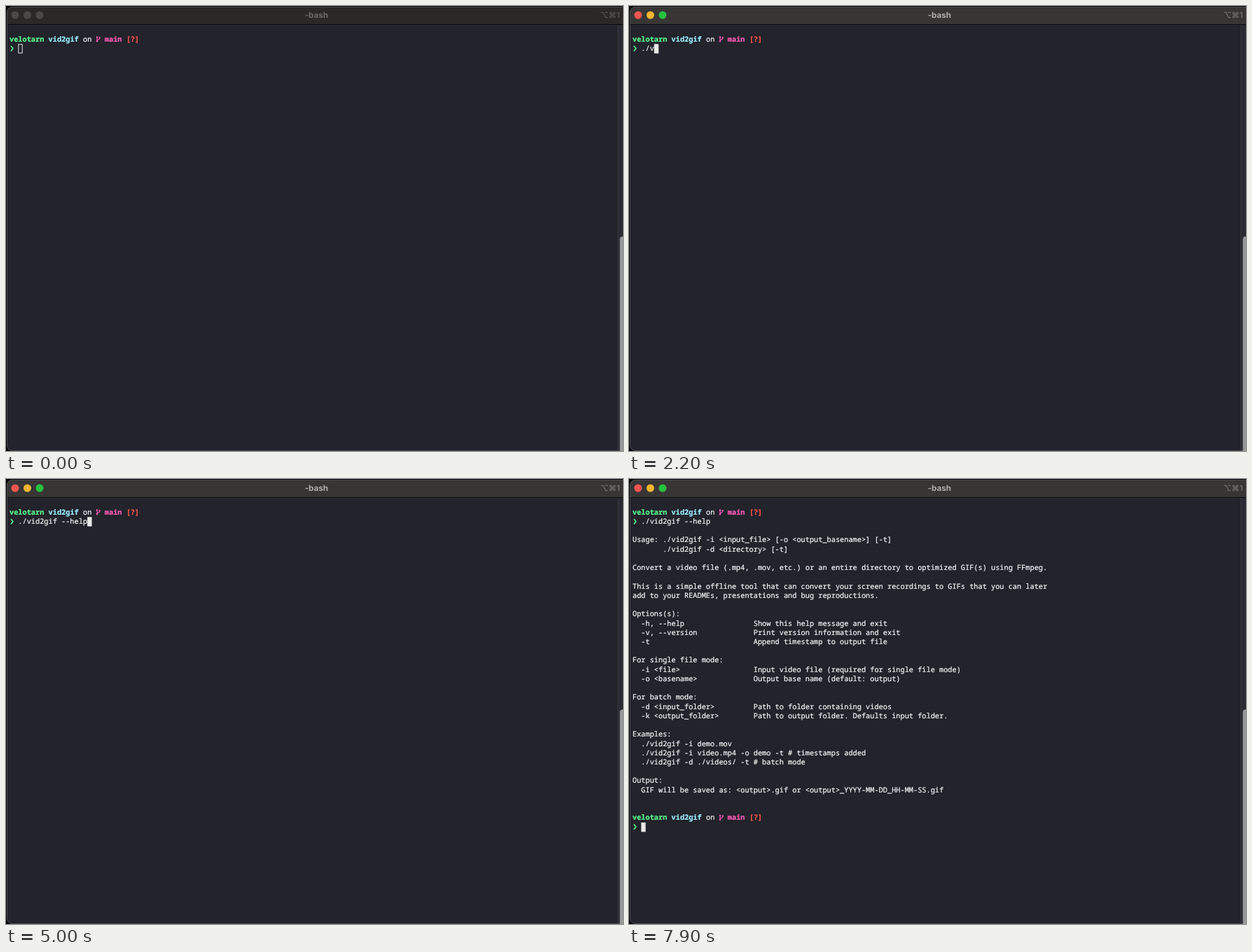
Recreate the animation shown at these times as an HTML page. Size 881 by 636 pixels, loop 8 s.

```html
<!DOCTYPE html>
<html lang="en">
<head>
<meta charset="utf-8">
<title>Terminal</title>
<style>
  html, body { margin: 0; width: 100%; height: 100%; overflow: hidden; background: #000; }
  svg { display: block; width: 100vw; height: 100vh; }
  text { white-space: pre; text-rendering: geometricPrecision; }
  .mono {
    font: 500 10.292px "Noto Sans Mono", monospace; font-variant-ligatures: none;
    fill: currentColor; stroke: currentColor; stroke-width: .22; color: #f6f6f5;
  }
  .bold { font-weight: 700; }
  .title { font: 700 11.6px Inter, sans-serif; text-anchor: middle; }
  .keys { font: 600 11.5px Inter, "DejaVu Sans", sans-serif; text-anchor: end; }
</style>
</head>
<body>
<svg viewBox="0 0 881 636" xmlns="http://www.w3.org/2000/svg">
  <defs>
    <clipPath id="frame"><rect x="1" y="1" width="890" height="635" rx="8"/></clipPath>
  </defs>
  <rect width="881" height="636" fill="#050506"/>
  <g clip-path="url(#frame)">
    <rect width="881" height="636" fill="#22232b"/>
    <rect id="bar" width="881" height="26"/>
    <rect y="26" width="881" height="1" fill="#08080a"/>
    <rect y="27" width="881" height="1" fill="#2b2c33"/>
    <rect x="873" y="27" width="8" height="609" fill="#2b2c33"/>
    <rect x="873" y="27" width="1" height="609" fill="#36373e"/>
  </g>
  <rect x="1.5" y="1.5" width="890" height="634" rx="8" fill="none" stroke="#4c4c50"/>
  <rect x="876.5" y="329.5" width="9" height="312" rx="3.5" fill="#98999c"/>
  <g id="lights"></g>
  <circle id="dot" cx="13" cy="13" r="1.6" fill="#7d1512"/>
  <text id="title" class="title" x="443.3" y="17"></text>
  <text id="keys" class="keys" x="876.5" y="17">⌥⌘1</text>
  <g id="top"></g>
  <text id="command" class="mono"></text>
  <g id="help"></g>
  <g id="next"></g>
  <rect id="cursor"/>
  <g id="pointer" fill="none" stroke-linecap="round"></g>
</svg>
<script>
const LOOP = 8000, CELL = 6.175, ROW = 13.23;
const FOCUS = 500, RUN = 5600, DONE = 5700, HIDE = 1600;
const GREEN = '#5af78e', CYAN = '#9aedfe', PINK = '#ff5cb8', RED = '#ff544c';
const LIGHTS = ['#f2554f', '#f2b52f', '#27c140'];
const BEAM = 'M-2.7-7Q-.4-7 0-5Q.4-7 2.7-7M0-5V5M-2.7 7Q-.4 7 0 5Q.4 7 2.7 7M-1.4 1H1.4';
const COMMAND = './vid2gif --help';
const KEYS = [1600, 1800, 2100, 2300, 2500, 2700, 2800, 2900, 3100, 3300, 3500, 3600, 3800, 4100, 4300, 4800];
const HELP = `Usage: ./vid2gif -i <input_file> [-o <output_basename>] [-t]
       ./vid2gif -d <directory> [-t]

Convert a video file (.mp4, .mov, etc.) or an entire directory to optimized GIF(s) using FFmpeg.

This is a simple offline tool that can convert your screen recordings to GIFs that you can later
add to your READMEs, presentations and bug reproductions.

Options(s):
  -h, --help                Show this help message and exit
  -v, --version             Print version information and exit
  -t                        Append timestamp to output file

For single file mode:
  -i <file>                 Input video file (required for single file mode)
  -o <basename>             Output base name (default: output)

For batch mode:
  -d <input_folder>         Path to folder containing videos
  -k <output_folder>        Path to output folder. Defaults input folder.

Examples:
  ./vid2gif -i demo.mov
  ./vid2gif -i video.mp4 -o demo -t # timestamps added
  ./vid2gif -d ./videos/ -t # batch mode

Output:
  GIF will be saved as: <output>.gif or <output>_YYYY-MM-DD_HH-MM-SS.gif`;

const $ = id => document.getElementById(id);
const colX = col => 5 + col * CELL;
const baseY = row => 50.8 + row * ROW;

function set(el, attrs) {
  for (const key in attrs) el.setAttribute(key, attrs[key]);
  return el;
}

function add(parent, tag, attrs) {
  return parent.appendChild(set(document.createElementNS('http://www.w3.org/2000/svg', tag), attrs));
}

function write(parent, col, row, str, style = {}) {
  add(parent, 'text', { class: 'mono', x: colX(col), y: baseY(row), ...style }).textContent = str;
}

function drawPrompt(parent, row) {
  const bold = (col, str, color) => write(parent, col, row, str, { class: 'mono bold', style: `color:${color}` });
  bold(0, 'velotarn', GREEN);
  bold(9, 'vid2gif', CYAN);
  write(parent, 17, row, 'on');
  bold(22, 'main', PINK);
  bold(27, '[?]', RED);
  const y = baseY(row);
  const branch = add(parent, 'g', { transform: `translate(128.5 ${y - 7.6})`, fill: PINK, stroke: PINK });
  add(branch, 'path', { d: 'M1.5 1.5V7M1.5 5.4Q5.2 5 5.2 2.6', fill: 'none', 'stroke-width': 1.1 });
  for (const [cx, cy] of [[1.5, 1.3], [1.5, 7], [5.2, 2]])
    add(branch, 'circle', { cx, cy, r: 1.2, stroke: 'none' });
  add(parent, 'path', {
    d: `M7 ${y + 6.2}l2.9 3.7l-2.9 3.7`, fill: 'none', stroke: GREEN, 'stroke-width': 1.7
  });
}

function drawCursor(col, row, solid) {
  const inset = solid ? 0 : .5;
  set($('cursor'), {
    x: colX(col) + inset, y: 41.1 + row * ROW + inset,
    width: 6.4 - 2 * inset, height: 13.4 - 2 * inset,
    fill: solid ? '#e9e9e9' : 'none', stroke: solid ? 'none' : '#e9e9e9'
  });
}

function show(id, on) {
  $(id).style.display = on ? '' : 'none';
}

function draw(t) {
  const focused = t >= FOCUS, running = t >= RUN && t < DONE;
  set($('bar'), { fill: focused ? '#383635' : '#2b2827' });
  set($('title'), { fill: focused ? '#b0aeac' : '#6c6967' });
  set($('keys'), { fill: focused ? '#737170' : '#555251' });
  [...$('lights').children].forEach((light, i) => set(light, { fill: focused ? LIGHTS[i] : '#4b4846' }));
  $('title').textContent = running ? 'starship' : '-bash';

  const typed = KEYS.filter(k => t >= k).length;
  $('command').textContent = COMMAND.slice(0, typed);
  show('dot', running);
  show('help', t >= RUN);
  show('next', t >= DONE);
  if (running) drawCursor(0, 32, true);
  else if (t >= DONE) drawCursor(2, 34, true);
  else drawCursor(2 + typed, 1, focused);

  show('pointer', t >= 100 && t < HIDE);
  const left = (1 - Math.min(1, Math.max(0, (t - 100) / 600))) ** 3;
  set($('pointer'), { transform: `translate(${488.6 + 72 * left} ${212.5 + 44 * left})` });
}

LIGHTS.forEach((_, i) => add($('lights'), 'circle', { cx: 13 + 17.5 * i, cy: 13, r: 5.5 }));
add($('pointer'), 'path', { d: BEAM, stroke: '#f4f4f4', 'stroke-width': 3 });
add($('pointer'), 'path', { d: BEAM, stroke: '#17181c', 'stroke-width': 1 });
set($('command'), { x: colX(2), y: baseY(1) });
drawPrompt($('top'), 0);
drawPrompt($('next'), 33);
HELP.split('\n').forEach((line, i) => line && write($('help'), 0, i + 3, line));

function tick() {
  draw(performance.now() % LOOP);
  requestAnimationFrame(tick);
}
tick();
</script>
</body>
</html>
```
